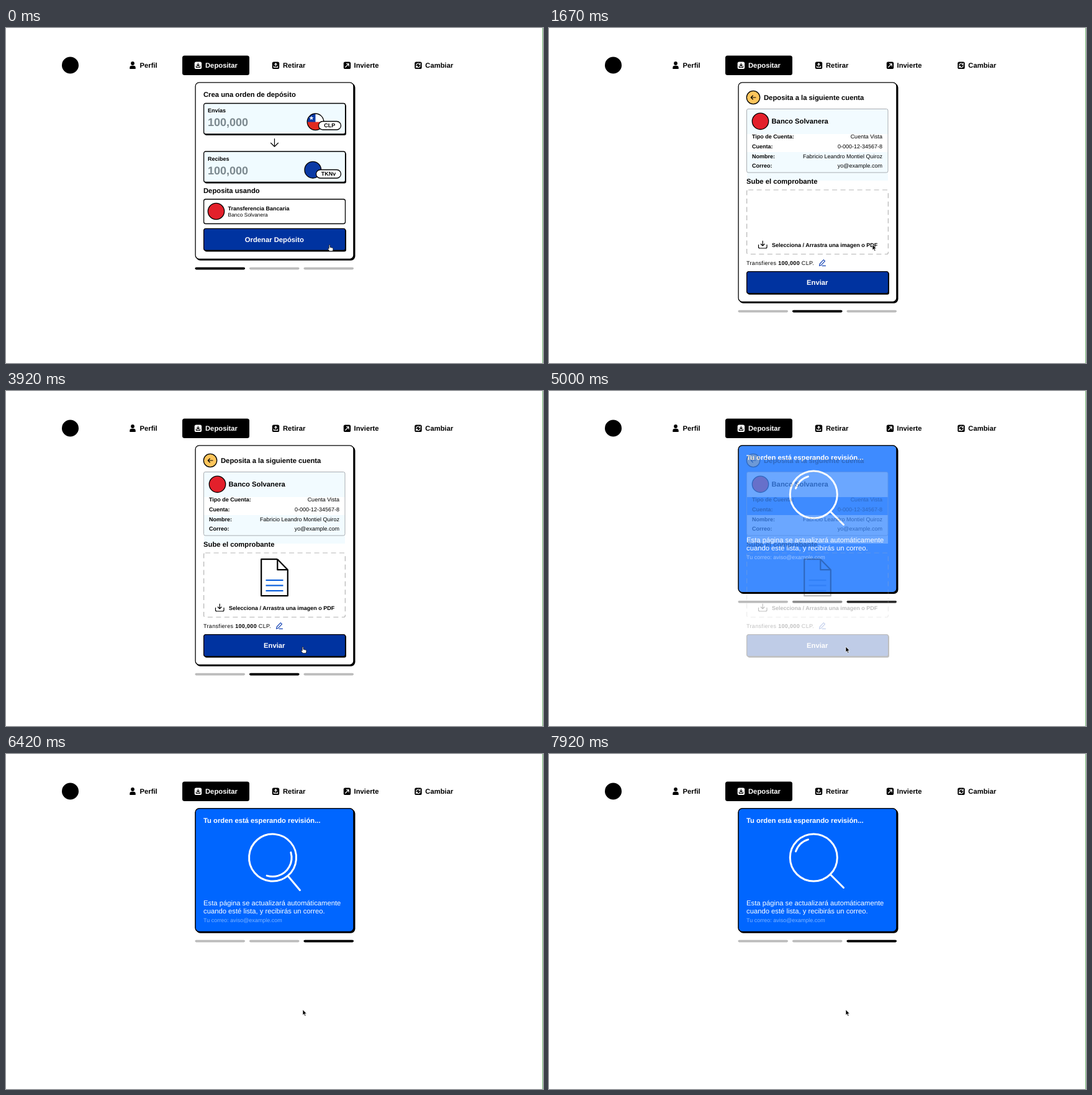
Recreate the animation shown at these times as an HTML page. Size 865 by 540 pixels, loop 8 s.

```html
<!DOCTYPE html>
<html lang="es">
<head>
<meta charset="utf-8">
<title>Orden de depósito</title>
<style>
html, body { margin: 0; width: 100%; height: 100%; overflow: hidden; background: #fff; }
svg { display: block; }
text { font: 9px "Liberation Sans", Arial, sans-serif; text-rendering: geometricPrecision; white-space: pre; }
.b { font-weight: bold; }
.h { font-weight: bold; font-size: 11.25px; }
.p { font-size: 11.25px; }
.amount { font-weight: bold; font-size: 18px; fill: #7b888e; }
.mid { text-anchor: middle; }
.end { text-anchor: end; }
.w { fill: #fff; }
.box { stroke: #000; stroke-width: 1.3; }
.line { fill: none; stroke: #000; stroke-width: 1.2; stroke-linecap: round; stroke-linejoin: round; }
.white { stroke: #fff; }
</style>
</head>
<body>
<svg width="865" height="540" viewBox="0 0 865 540">
  <defs>
    <rect id="tile" x="-5.7" y="-5.7" width="11.4" height="11.4" rx="2.6"/>
    <path id="tray" d="M-3 1.3V3H3V1.3"/>
    <g id="bars">
      <rect x="304.5" width="80.5" height="3.6" rx="1.8"/>
      <rect x="392" width="80.5" height="3.6" rx="1.8"/>
      <rect x="479.5" width="80.5" height="3.6" rx="1.8"/>
    </g>
    <g id="field">
      <rect x="320" y="1.5" width="228" height="50" rx="3"/>
      <rect class="box" x="318.6" width="228" height="49.5" rx="3" fill="#f0fbff"/>
    </g>
    <clipPath id="coin"><circle cx="498.5" cy="151.3" r="13.3"/></clipPath>
  </defs>

  <path d="M864.5 0V540" stroke="#6fb46f"/>

  <!-- navigation -->
  <circle cx="103.5" cy="60" r="13.5"/>
  <rect x="284" y="44.5" width="108" height="31.5" rx="3.5"/>
  <circle cx="204" cy="57" r="2.9"/>
  <path d="M199.3 66v-2q0-3.3 3.3-3.3h2.8q3.3 0 3.3 3.3v2z"/>
  <g transform="translate(309.4 60.3)"><use href="#tile" fill="#fff"/>
    <g class="line"><use href="#tray"/><path d="M0-3.3V1M-1.8-.8 0 1 1.8-.8"/></g></g>
  <g transform="translate(434.5 60.3)"><use href="#tile"/>
    <g class="line white"><use href="#tray"/><path d="M0 1V-3.3M-1.8-1.5 0-3.3 1.8-1.5"/></g></g>
  <g transform="translate(549.5 60.3)"><use href="#tile"/>
    <path class="line white" d="M-2.7 2.7 2.7-2.7M-1-2.7H2.7V1"/></g>
  <g transform="translate(664 60.3)"><use href="#tile"/>
    <path class="line white" d="M-3.2-.5A3.2 3.2 0 0 1 2.8-1.6M3.2-3.4V-1.3H1M3.2.5A3.2 3.2 0 0 1-2.8 1.6M-3.2 3.4V1.3H-1"/></g>
  <text class="h" x="215.5" y="64">Perfil</text>
  <text class="h w" x="321" y="64">Depositar</text>
  <text class="h" x="446" y="64">Retirar</text>
  <text class="h" x="560.5" y="64">Invierte</text>
  <text class="h" x="675.3" y="64">Cambiar</text>

  <!-- card -->
  <rect id="shadow" x="306" y="89" width="256.5" rx="7"/>
  <rect id="card" class="box" x="305.1" y="87.9" width="254.8" rx="6" fill="#fff"/>
  <g id="steps">
    <use href="#bars" fill="#bcbcbc"/>
    <rect class="step" x="304.5" width="80.5" height="3.6" rx="1.8"/>
    <rect class="step" x="392" width="80.5" height="3.6" rx="1.8"/>
    <rect class="step" x="479.5" width="80.5" height="3.6" rx="1.8"/>
  </g>

  <!-- waiting for review -->
  <g id="review">
    <rect id="blue" class="box" x="305.1" y="87.9" width="254.8" rx="6" fill="#06f"/>
    <text class="h w" x="318" y="111">Tu orden está esperando revisión...</text>
    <g id="lens" fill="none" stroke="#fff" stroke-width="3" stroke-linecap="round">
      <circle cx="426.3" cy="167" r="38"/>
      <path d="M453.5 194.5 474.5 215.5"/>
      <circle id="glint" cx="426.3" cy="167" r="30.5" pathLength="360"/>
    </g>
    <text class="p w" x="318" y="243.5">Esta página se actualizará automáticamente</text>
    <text class="p w" x="318" y="256.7">cuando esté lista, y recibirás un correo.</text>
    <text class="w" x="318" y="271.2" opacity=".5">Tu correo: aviso@example.com</text>
  </g>

  <!-- bank details and receipt -->
  <g id="transfer">
    <path d="M319 131H546V171H319zM319 200H546V246H319z" fill="#f2fbff"/>
    <circle class="box" cx="329" cy="112" r="10.7" fill="#fdc55c"/>
    <path class="line" d="M333 112H325.3M328.3 109 325.3 112 328.3 115"/>
    <text class="h" x="346" y="116">Deposita a la siguiente cuenta</text>
    <rect x="318.5" y="130.5" width="227.5" height="102.5" rx="2.5" fill="none" stroke="#a9adb2"/>
    <circle class="box" cx="340.5" cy="150.3" r="13.2" fill="#e3202b"/>
    <text class="h" x="358.5" y="154.2">Banco Solvanera</text>
    <text class="b" x="327" y="178">Tipo de Cuenta:</text><text class="end" x="537" y="178">Cuenta Vista</text>
    <text class="b" x="327" y="193.8">Cuenta:</text><text class="end" x="537" y="193.8">0-000-12-34567-8</text>
    <text class="b" x="327" y="209.5">Nombre:</text><text class="end" x="537" y="209.5">Fabricio Leandro Montiel Quiroz</text>
    <text class="b" x="327" y="225.3">Correo:</text><text class="end" x="537" y="225.3">yo@example.com</text>
    <text class="h" x="318" y="250.6">Sube el comprobante</text>
    <rect x="318.6" y="261" width="227.8" height="103.5" rx="2.5" fill="none" stroke="#b5b5b5" stroke-width="1.2" stroke-dasharray="8 5.5"/>
    <g id="file" fill="none" stroke-width="2.2" stroke-linejoin="round">
      <path id="sheet" class="draw" pathLength="1" stroke="#000"/>
      <path id="fold" class="draw" pathLength="1" stroke="#000" d="M437.3 271.2V288.2H453.8"/>
      <path class="draw rule" pathLength="1" stroke="#0b5fdc" d="M418.5 305H446.5"/>
      <path class="draw rule" pathLength="1" stroke="#0b5fdc" d="M418.5 313.5H446.5"/>
      <path class="draw rule" pathLength="1" stroke="#0b5fdc" d="M418.5 322H446.5"/>
    </g>
    <path class="line" d="M337.5 349.5V353q0 2 2 2h9.5q2 0 2-2v-3.500M344.2 343.300V351M341.300 348.200 344.200 351 347.100 348.200"/>
    <text class="b" x="359" y="352.8">Selecciona / Arrastra una imagen o PDF</text>
    <text x="318" y="382" letter-spacing=".33">Transfieres <tspan class="b">100,000</tspan> CLP.</text>
    <path class="line" style="stroke:#1443b4" d="M435.500 383.300 436.300 380 442.300 373.600 444.500 375.600 438.500 382.200ZM440 383.300H445.500"/>
  </g>

  <!-- new order -->
  <g id="order">
    <text class="h" x="318" y="111">Crea una orden de depósito</text>
    <use href="#field" y="121.500"/>
    <text class="b" x="325" y="136">Envías</text>
    <text class="amount" x="325" y="158">100,000</text>
    <g clip-path="url(#coin)">
      <rect x="485" y="138" width="27" height="27" fill="#fff"/>
      <rect x="485" y="138" width="13.500" height="14" fill="#0b3aa5"/>
      <rect x="485" y="151.500" width="27" height="14" fill="#e02a20"/>
    </g>
    <path fill="#fff" d="M492 141.500 492.900 144 495.500 144.100 493.400 145.700 494.200 148.200 492 146.700 489.800 148.200 490.600 145.700 488.500 144.100 491.100 144Z"/>
    <circle class="box" cx="498.500" cy="151.300" r="13.300" fill="none"/>
    <rect class="box" x="503.500" y="150.500" width="36" height="13.500" rx="6.750" fill="#fff"/>
    <text class="b mid" x="521.300" y="160.400">CLP</text>
    <path class="line" d="M432.500 178.500V191M426.500 185.300 432.500 191.200 438.500 185.300"/>
    <use href="#field" y="199"/>
    <text class="b" x="325" y="213.600">Recibes</text>
    <text class="amount" x="325" y="235.600">100,000</text>
    <circle class="box" cx="494.300" cy="228.700" r="13.300" fill="#0b3aa5"/>
    <rect class="box" x="499.500" y="228.500" width="40" height="13.500" rx="6.750" fill="#fff"/>
    <text class="b mid" x="519.500" y="238.400">TKNv</text>
    <text class="h" x="318" y="266">Deposita usando</text>
    <rect class="box" x="318.600" y="276" width="227.900" height="39.500" rx="3" fill="#fff"/>
    <circle class="box" cx="338.500" cy="295.500" r="13.200" fill="#e3202b"/>
    <text class="b" x="357.500" y="294.200">Transferencia Bancaria</text>
    <text style="font-size:8.450px" x="357.500" y="303.800">Banco Solvanera</text>
  </g>

  <g id="button">
    <rect x="320" y="1.500" width="228" height="36" rx="3"/>
    <rect class="box" x="318.600" y=".300" width="228" height="35.200" rx="3" fill="#0033a0"/>
    <text id="labelOrder" class="h w mid" x="432.300" y="22">Ordenar Depósito</text>
    <text id="labelSend" class="h w mid" x="432.300" y="22">Enviar</text>
  </g>

  <g id="cursor" stroke="#fff" stroke-width=".7" stroke-linejoin="round">
    <path id="arrow" d="M0 0V9L2 7.200 3.500 10.500 5 9.800 3.500 6.700H6.300Z"/>
    <path id="hand" fill="#fff" stroke="#000" d="M-.8.900Q.2-.3 1 .9V4.500L4.900 5.300Q6.200 5.700 6 7.200L5.300 10.700H.2L-2.600 7.200Q-2.800 5.600-.8 6.600Z"/>
  </g>
</svg>
<script>
const $ = id => document.getElementById(id);
const set = (el, attrs) => { for (const k in attrs) el.setAttribute(k, attrs[k]); };
const fade = (id, v) => $(id).setAttribute("opacity", v);
const mix = (a, b, k) => a + (b - a) * k;
const span = (t, from, length) => Math.min(1, Math.max(0, (t - from) / length));
const reveal = (el, k) => set(el, { "stroke-dasharray": `${k} 2`, opacity: k > 0 ? 1 : 0 });

// cubic-bezier(.25, .1, .25, 1)
function ease(x) {
  const bez = (a, b, s) => 3 * a * s * (1 - s) ** 2 + 3 * b * s * s * (1 - s) + s ** 3;
  let lo = 0, hi = 1;
  for (let i = 0; i < 20; i++) {
    const m = (lo + hi) / 2;
    if (bez(.25, .25, m) < x) lo = m; else hi = m;
  }
  return x >= 1 ? 1 : bez(.1, 1, lo);
}

function drawFile(t) {
  const fold = ease(span(t, 2680, 350));
  const cx = mix(451, 445.6, fold), cy = mix(274, 279.7, fold);
  set($("file"), { transform: `translate(0 ${-2 * (1 - fold)})` });
  set($("sheet"), { d: `M437.3 271.2H411.2V330.2H453.8V288.2Q${cx} ${cy} 437.3 271.2Z` });
  reveal($("sheet"), ease(span(t, 2100, 450)));
  reveal($("fold"), fold);
  document.querySelectorAll(".rule").forEach((el, i) => reveal(el, ease(span(t, 2250 + i * 70, 250))));
}

function drawLens(t) {
  const u = span(t, 6200, 1700);
  const arc = 54 + 96 * Math.abs(Math.sin(2 * Math.PI * u));
  const turn = 226 + 720 * (1 - (1 - u) ** 2);
  set($("lens"), { transform: `rotate(${12.3 * Math.sin(Math.PI * u)} 427 205)` });
  set($("glint"), { "stroke-dasharray": `${arc} ${360 - arc}`, transform: `rotate(${turn - arc / 2} 426.3 167)` });
}

function drawCursor(t) {
  const k = ease(span(t, 3380, 480));
  const x = mix(521, 478, k), y = mix(349, 412, k);
  const hand = t < 120 || (y > 392 && t < 4700);
  set($("cursor"), { transform: `translate(${x} ${y})` });
  fade("hand", +hand);
  fade("arrow", +!hand);
}

function render(t) {
  const sent = ease(span(t, 40, 750));
  const done = ease(span(t, 4660, 750));
  const bottom = mix(mix(372.3, 441.3, sent), 286.3, done);

  set($("shadow"), { height: bottom - 86.5 });
  for (const id of ["card", "blue"]) set($(id), { height: bottom - 87.9 });
  set($("steps"), { transform: `translate(0 ${bottom + 13.5})` });
  [1 - sent, sent * (1 - done), done].forEach((v, i) =>
    document.querySelectorAll(".step")[i].setAttribute("opacity", v));

  fade("order", 1 - sent);
  fade("transfer", sent * (1 - done));
  fade("review", done);
  fade("button", 1 - done);
  fade("labelOrder", 1 - sent);
  fade("labelSend", sent);
  set($("button"), { transform: `translate(0 ${mix(323, 392.3, sent)})` });

  drawFile(t);
  drawLens(t);
  drawCursor(t);
}

function tick() {
  render(performance.now() % 8000);
  requestAnimationFrame(tick);
}
tick();
</script>
</body>
</html>
```
